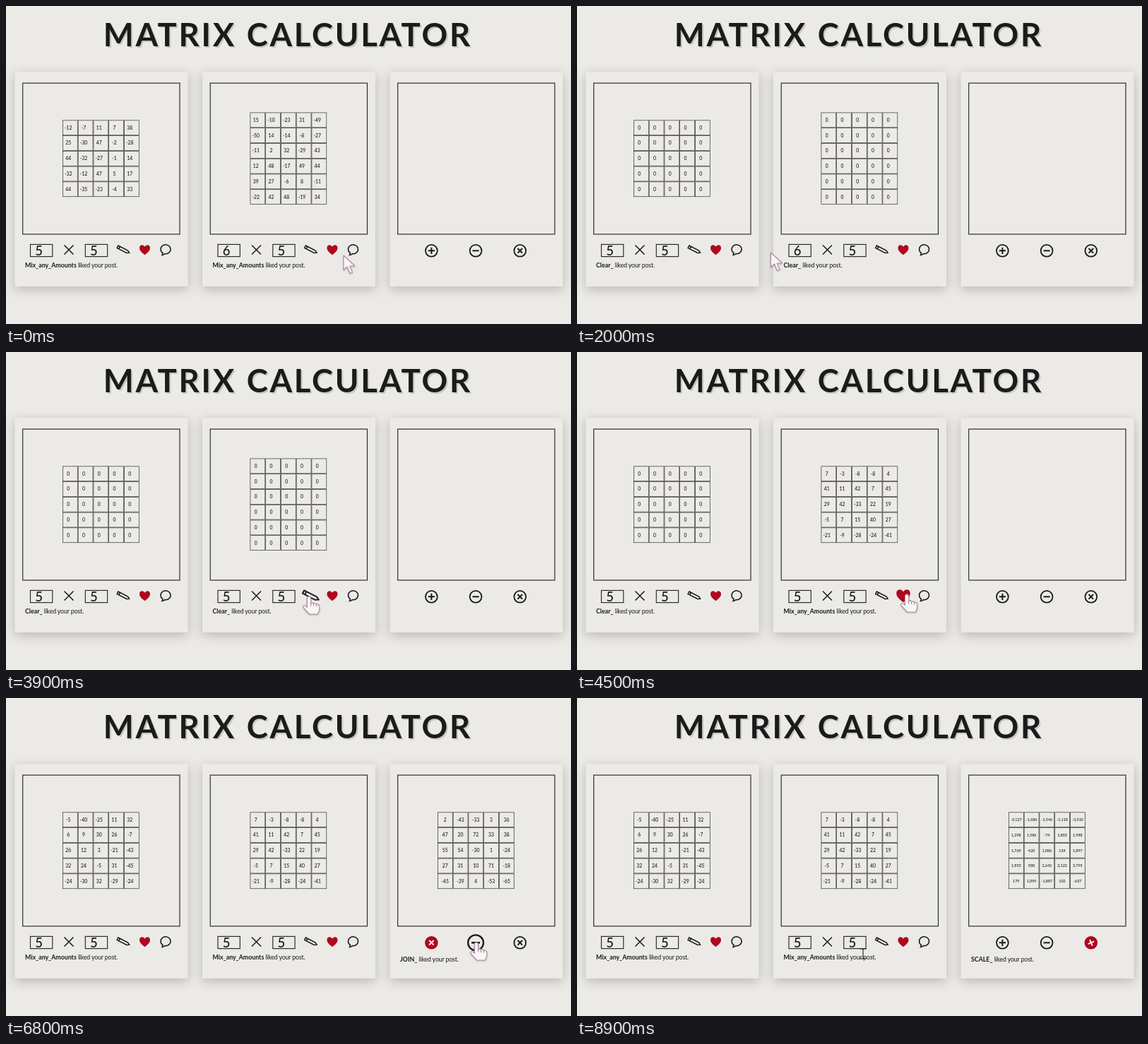
Recreate the animation shown at these times as an HTML page. Size 800 px wide and 450 px high, loop 9000 ms.

```html
<!DOCTYPE html>
<html lang="en">
<head>
<meta charset="utf-8">
<title>Matrix calculator</title>
<style>
html, body { margin: 0; width: 100%; height: 100%; overflow: hidden; background: #ebeae6; }
svg { display: block; width: 100vw; height: 100vh; font-family: Lato, "Open Sans", sans-serif; fill: #191919; }
.title { font-size: 45.5px; font-weight: 700; letter-spacing: 2.7px; text-anchor: middle; }
.card { fill: #ebeae6; filter: drop-shadow(0 4px 8px rgba(0, 0, 0, .22)); }
.line { fill: none; stroke: #262626; stroke-width: 1.15; }
.cell { fill: none; stroke: #333; stroke-width: .7; }
.mid { text-anchor: middle; font-weight: 500; }
.size { font-size: 18.5px; font-weight: 500; text-anchor: middle; }
.note { font-size: 8.8px; letter-spacing: -.15px; }
.note tspan { font-weight: 700; letter-spacing: 0; }
.ico { fill: none; stroke: #191919; stroke-width: 1.5; }
.ptr { fill: #f8f7f5; stroke: #b08ba4; stroke-width: 1.2; stroke-linejoin: round; filter: drop-shadow(0 1px 1px rgba(0, 0, 0, .2)); }
</style>
</head>
<body>
<svg id="stage" viewBox="0 0 800 450" preserveAspectRatio="none"></svg>
<script>
const LOOP = 9000, STEP = 100, GAP = 265.5, PITCH = 21.75, RED = '#b0061f';
const stage = document.getElementById('stage');

const parse = s => s.split('/').map(r => r.trim().split(/\s+/).map(Number));
const zeros = (rows, cols) => Array.from({ length: rows }, () => Array(cols).fill(0));
const zip = (a, b, f) => a.map((r, i) => r.map((v, j) => f(v, b[i][j])));
const product = (a, b) => a.map(r => b[0].map((_, j) => r.reduce((s, v, k) => s + v * b[k][j], 0)));

const left1 = parse('-12 -7 11 7 38/25 -30 47 -2 -28/44 -32 -27 -1 14/-32 -12 47 5 17/44 -35 -23 -4 33');
const right1 = parse('15 -10 -23 31 -49/-50 14 -14 -8 -27/-11 2 32 -29 43/12 48 -17 49 44/39 27 -6 8 -11/-22 42 48 -19 34');
const left2 = parse('-5 -40 -25 11 32/6 9 30 26 -7/26 12 3 -21 -43/32 24 -5 31 -45/-24 -30 32 -29 -24');
const right2 = parse('7 -3 -8 -8 4/41 11 42 7 45/29 42 -33 22 19/-5 7 15 40 27/-21 -9 -28 -24 -41');

// Each entry: start time, matrix, user name
const RANDOM = 'Mix_any_Amounts', CLEAR = 'Clear_';
const lefts = [[0, left1, RANDOM], [1600, zeros(5, 5), CLEAR], [5300, left2, RANDOM]];
const rights = [[0, right1, RANDOM], [500, zeros(6, 5), CLEAR], [4100, zeros(5, 5), CLEAR], [4400, right2, RANDOM]];
const results = [
  [0, null, ''],
  [6300, zip(left2, right2, (a, b) => a + b), 'JOIN_'],
  [7200, zip(left2, right2, (a, b) => a - b), 'TAKES_'],
  [7800, product(left2, right2), 'SCALE_']
];

// Pointer keys: time, x, y, shape until the next key
const path = [
  [0, 478, 353, 'arrow'], [200, 479, 352, 'arrow'], [400, 490, 347, 'hand'], [700, 489, 347, 'arrow'],
  [1100, 213, 350, 'hand'], [1300, 213, 349, 'hand'], [1500, 226, 346, 'hand'],
  [1800, 227, 346, 'arrow'], [2200, 322, 352, 'arrow'], [2300, 322, 352, 'beam'], [2600, 340, 357, 'beam'],
  [3000, 340, 357, 'beam'], [3200, 327, 350, 'arrow'], [3500, 327, 350, 'arrow'], [3900, 429, 346, 'hand'],
  [4100, 431, 345, 'hand'], [4300, 463, 344, 'hand'], [4500, 467, 343, 'hand'], [4700, 465, 347, 'hand'],
  [4900, 465, 347, 'arrow'], [5200, 198, 345, 'hand'], [5300, 197, 345, 'hand'], [5600, 247, 342, 'hand'],
  [5700, 330, 350, 'arrow'], [5900, 601, 347, 'hand'], [6400, 603, 347, 'hand'], [6800, 666, 346, 'hand'],
  [7300, 666, 346, 'hand'], [7600, 728, 347, 'hand'], [7900, 728, 347, 'hand'], [8000, 736, 365, 'arrow'],
  [8100, 745, 381, 'arrow'], [8200, 730, 387, 'arrow'], [8600, 520, 372, 'arrow'], [8800, 425, 364, 'beam'],
  [8900, 405, 362, 'beam']
];

const shapes = {
  arrow: '<path class="ptr" d="M0 0V20.5L5 16L9 25.5L12.6 24L8.8 15H16Z"/>',
  hand: '<path class="ptr" d="M-2.6 2.5a2.6 2.6 0 0 1 5.2 0V9.5q2.3-1.3 4 .6q2.5-1 4 1.1q4-.6 4.2 3V19L12.5 25H.5L-7.2 16.5q-2-3 .4-3.8q2 0 4.2 2.6ZM2.6 9.5v4M6.6 10.5v3.5M10.6 11.5v3"/>',
  beam: '<path class="line" d="M-4.5-7H-1Q0-7 0-6Q0-7 1-7H4.5M0-6V6M-4.5 7H-1Q0 7 0 6Q0 7 1 7H4.5"/>'
};

const clamp = v => Math.max(0, Math.min(1, v));
const ease = v => v * v * (3 - 2 * v);
const at = (list, t) => list.filter(e => e[0] <= t).pop();

function pointer(t) {
  const i = path.indexOf(at(path, t)), a = path[i], b = path[i + 1] || a;
  const k = b === a ? 0 : ease((t - a[0]) / (b[0] - a[0]));
  return { x: a[1] + (b[1] - a[1]) * k, y: a[2] + (b[2] - a[2]) * k, shape: a[3] };
}

const text = (x, y, s, cls, size) =>
  `<text class="${cls}" x="${x}" y="${y}"${size ? ` font-size="${size}"` : ''}>${s}</text>`;
const box = (x, y, w, h, cls = 'line') =>
  `<rect class="${cls}" x="${x}" y="${y}" width="${w}" height="${h}"/>`;

function grid(m, shift, size) {
  const top = 216.2 - m.length * PITCH / 2;
  return m.map((row, i) => row.map((v, j) => {
    const x = 80.4 + j * PITCH, y = top + i * PITCH;
    return box(x, y, 20.9, 20.9, 'cell') +
      text(x + shift, y + 10.4 + size * .36, v.toLocaleString('en-US'), 'mid', size);
  }).join('')).join('');
}

function icon(cursor, x, y, body, origin) {
  const d = Math.hypot(cursor.x - x - origin, cursor.y - y);
  const s = cursor.shape === 'hand' ? 1 + .3 * clamp((13 - d) / 4) : 1;
  return `<g transform="translate(${x} ${y}) scale(${s})">${body}</g>`;
}

const heart = `<path fill="${RED}" d="M0 7C-3 4.5-7.5 1.5-7.5-2.8C-7.5-7.8-1.8-8.2 0-4.4C1.8-8.2 7.5-7.8 7.5-2.8C7.5 1.5 3 4.5 0 7Z"/>`;
const bubble = '<path class="ico" d="M-5 7.6L-4 4.5A7 6.4 0 1 1-1 5.6Q-2.5 7.4-5 7.6Z"/>';
const pencil = '<path class="ico" transform="rotate(27)" d="M-9-1.9H6.4L9.6 0L6.4 1.9H-9ZM-6.2-1.9V1.9"/>';
const cross = '<path class="ico" d="M-6.5-6.5L6.5 6.5M6.5-6.5L-6.5 6.5"/>';

const frame = box(12.5, 93.3, 245, 303.5, 'card') + box(23.7, 109.1, 222.3, 213.8);
const note = (name, y) => name && `<text class="note" x="27" y="${y}"><tspan>${name} </tspan>liked your post.</text>`;

function inputCard(n, state, rows, cursor, spinner) {
  const x0 = n * GAP, [, m, name] = state;
  const arrows = spinner
    ? '<path fill="#333" d="M57.6 342.2l2.6-3l2.6 3ZM57.6 349.6l2.6 3l2.6-3Z"/>' : '';
  return `<g transform="translate(${x0})">${frame}${grid(m, 7.8, 6.8)}` +
    box(34.5, 337.4, 31.3, 17.2) + text(46.6, 353.3, rows, 'size') + arrows +
    `<g transform="translate(89 345)">${cross}</g>` +
    box(112.3, 337.4, 31.3, 17.2) + text(124.4, 353.3, 5, 'size') +
    icon(cursor, 166, 344.8, pencil, x0) + icon(cursor, 196.5, 345.2, heart, x0) +
    icon(cursor, 226, 345, bubble, x0) + note(name, 370) + '</g>';
}

// Sign path and its turn when selected
const signs = [
  ['M-4.6 0H4.6M0-4.6V4.6', 45],
  ['M-4.6 0H4.6', 45],
  ['M-3.3-3.3L3.3 3.3M3.3-3.3L-3.3 3.3', 22]
];

function resultCard(t, cursor) {
  const x0 = 2 * GAP, state = at(results, t), [start, m, name] = state;
  const active = results.indexOf(state) - 1;
  const icons = signs.map(([d, turn], i) => {
    const on = i === active, a = on ? turn * ease(clamp((t - start) / 300)) : 0;
    const body = `<circle r="8.4" stroke="${on ? RED : '#191919'}" stroke-width="1.8" fill="${on ? RED : 'none'}"/>` +
      `<path d="${d}" transform="rotate(${a})" stroke="${on ? '#f3efec' : '#191919'}" stroke-width="2"/>`;
    return icon(cursor, 71.4 + i * 62.7, 346.3, body, x0);
  }).join('');
  return `<g transform="translate(${x0})">${frame}` +
    (m ? grid(m, 10.4, active === 2 ? 5.4 : 6.8) : '') + icons + note(name, 372.6) + '</g>';
}

const words = (dx, dy, color) => `<g fill="${color}" transform="translate(${dx} ${dy})">` +
  text(231.8, 57, 'MATRIX', 'title') + text(500.3, 57, 'CALCULATOR', 'title') + '</g>';
const heading = words(2, 2, '#c9c7c3') + words(0, 0, '#1b1b1b');

function draw(t) {
  const c = pointer(t);
  stage.innerHTML = heading + inputCard(0, at(lefts, t), 5, c, false) +
    inputCard(1, at(rights, t), t < 3400 ? 6 : 5, c, t >= 2500 && t < 3700) + resultCard(t, c) +
    `<g transform="translate(${c.x} ${c.y})">${shapes[c.shape]}</g>`;
}

const begin = performance.now();
let last = -1;
function tick() {
  const t = Math.floor((performance.now() - begin) % LOOP / STEP) * STEP;
  if (t !== last) draw(last = t);
  requestAnimationFrame(tick);
}
tick();
</script>
</body>
</html>
```
